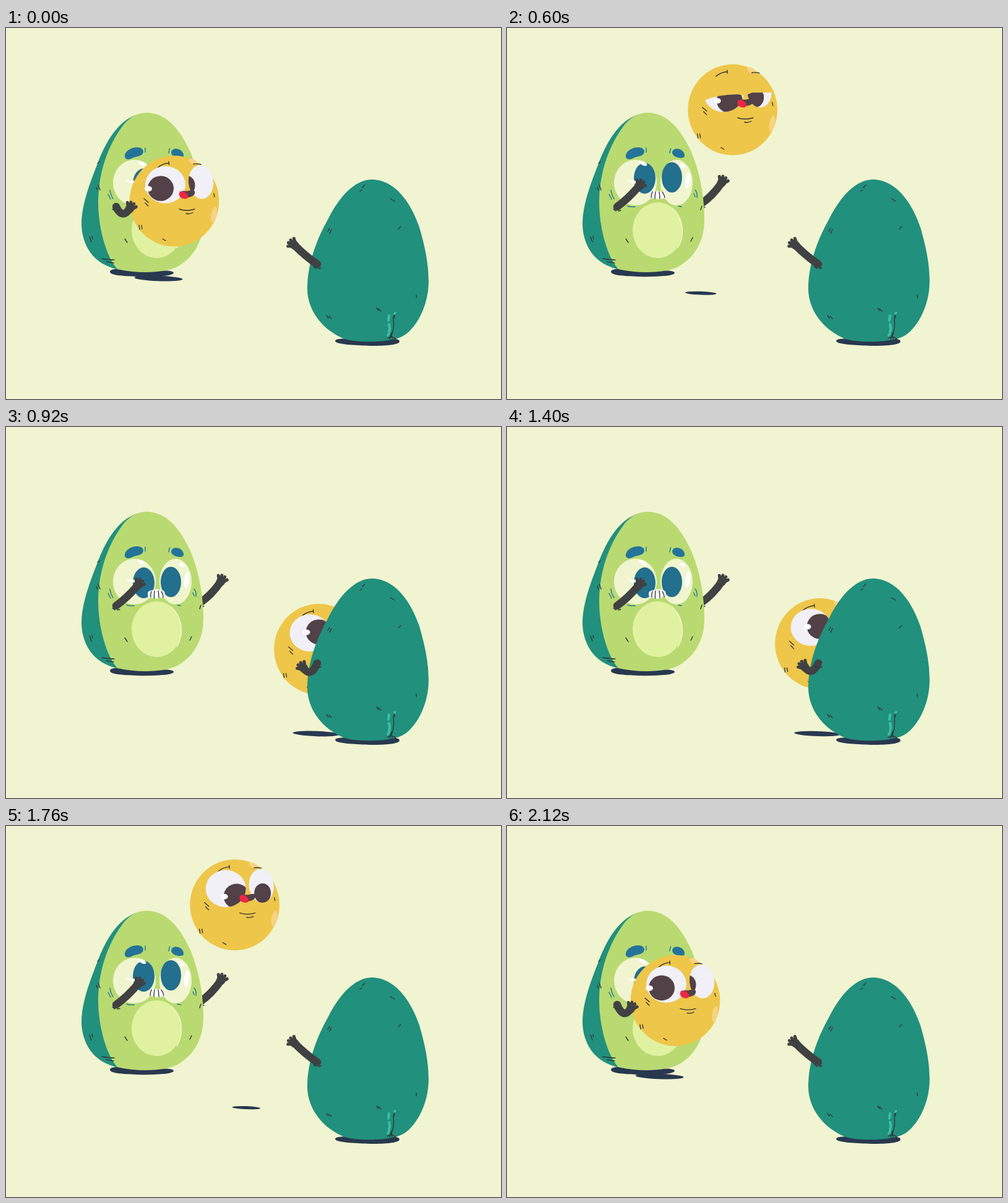
An HTML page that plays this animation: 800x600 px, repeating every 2160 ms.

```html
<!DOCTYPE html>
<html lang="en">
<head>
<meta charset="utf-8">
<title>Avocado catch</title>
<style>
html, body { margin: 0; width: 100%; height: 100%; overflow: hidden; background: #f0f4d0; }
svg { display: block; width: 100vw; height: 100vh; }
.line { fill: none; stroke: #33383a; stroke-width: 1.4; stroke-linecap: round; }
.teal { stroke: #1f7893; }
.arm { fill: none; stroke: #404142; stroke-width: 12.5; stroke-linecap: round; stroke-linejoin: round; }
.shadow { fill: #28384f; }
.skin { fill: #21907d; }
.iris { fill: #236f8e; }
.brow { fill: #24749a; }
.pupil { fill: #524146; }
.white { fill: #fff; }
.cream { fill: #f0f5cf; }
.shine { fill: #f7d384; }
</style>
</head>
<body>
<svg viewBox="0 0 800 600">
  <defs>
    <clipPath id="eyeL"><ellipse cx="-14.5" cy="-26.5" rx="32.5" ry="30"/></clipPath>
    <clipPath id="eyeR"><ellipse cx="43" cy="-31" rx="20" ry="27.5" transform="rotate(-6 43 -31)"/></clipPath>
    <clipPath id="lids"><path id="lid" d="M-80 -8L-46 -15Q-24 -25 8 -25L20 -23 32 -28 70 -28V60H-80Z"/></clipPath>
    <g id="hand">
      <ellipse rx="8" ry="7.2" fill="#404142"/>
      <path d="M1 -4L6 -8.5M3 -2L9.5 -4M3 1L10 1.5M2 4L8 7" fill="none" stroke="#404142" stroke-width="5" stroke-linecap="round"/>
    </g>
  </defs>
  <rect width="800" height="600" fill="#f0f4d0"/>

  <path class="shadow" d="M168 394C168 388 190 389 220 391C248 393 270 391 271 396C271 401 240 403 212 402C188 401 168 400 168 394Z"/>
  <ellipse id="ballShadow" class="shadow"/>

  <g id="farArm"></g>
  <g id="leftAvocado">
    <path class="skin" d="M212 140C180 150 160 187 148 219C136 250 122 285 122 318C123 348 138 383 184 391L240 300Z"/>
    <path fill="#b9da71" d="M228 137C263 138 284 170 299 203C314 240 319 280 319 310C319 350 298 375 275 387C255 396 215 398 180 390C163 372 149 325 149 282C149 235 164 190 191 155C203 142 214 137 228 137Z"/>
    <path class="line" d="M149 254l3 8M146 258l2 4M135 338l3 8M139 337l1 4M155 373q12 2 20 2M162 378l12 2M192 341l4 6M297 345l3 -6M313 294l2 -6M148 219l3 -3"/>
    <path class="line teal" d="M165 269l4 8M168 262q1 8 5 14M304 262q4 4 3 12M302 268l2 5M195 288q6 2 12 1M277 288l5 1M225 194v7M263 202l1.5 -7"/>
    <ellipse cx="243.500" cy="327" rx="40.500" ry="45" fill="#e0f2a0"/>
    <path d="M267 291Q286 310 283 336Q281 348 276 356" fill="none" stroke="#f0f5cf" stroke-width="1.5"/>
    <g id="eyes">
      <ellipse class="cream" cx="207.500" cy="250" rx="34.500" ry="37"/>
      <ellipse class="cream" cx="274" cy="250" rx="26" ry="37"/>
      <g id="gaze">
        <ellipse class="iris" cx="222.500" cy="252" rx="17.500" ry="25"/>
        <ellipse class="iris" cx="266.500" cy="250.500" rx="16.500" ry="24.500"/>
      </g>
      <ellipse class="white" cx="220" cy="219" rx="7" ry="3" transform="rotate(25 220 219)"/>
      <path class="white" d="M194 246Q204 248 214 246L212 252Q200 252 194 246Z"/>
      <ellipse class="white" cx="292" cy="247" rx="4" ry="13" transform="rotate(8 292 247)"/>
      <ellipse class="white" cx="284" cy="223" rx="5" ry="3" transform="rotate(35 284 223)"/>
    </g>
    <path class="brow" d="M192 206C193 199 202 193 212 193C220 193 224 198 221 203C217 209 209 207 203 211C197 214 191 212 192 206Z"/>
    <path class="brow" d="M267 202C267 196 273 194 279 196C285 198 289 205 286 209C281 212 268 209 267 202Z"/>
    <g id="mouthLow">
      <path class="white" d="M229 270C229 263 236 265 239 263C245 261 250 264 255 265C259 270 255 276 249 276C244 279 238 277 235 276C231 277 229 274 229 270Z"/>
      <path class="line" d="M235 266q-2 5 -1 9M240 265q-1 6 -.5 12M246 265q1 6 1 11M251 266q3 4 3 9"/>
    </g>
    <g id="mouthUp">
      <path class="white" d="M232 266Q244 261 255 266L258 274Q245 280 232 274Z"/>
      <path class="line" d="M235 265q-2 5 -2 9M240 265q-1 6 -1 11M246 265q1 6 1 11M251 265q3 4 4 9"/>
    </g>
  </g>

  <g id="ball">
    <ellipse rx="72.300" ry="73.500" fill="#eec649"/>
    <ellipse class="shine" cx="30" cy="-64" rx="7.500" ry="4" transform="rotate(25 30 -64)"/>
    <ellipse class="shine" cx="64" cy="22" rx="4.500" ry="13" transform="rotate(10 64 22)"/>
    <path class="line" d="M-27 -54Q-19 -61 -9 -61.500M-9 -64l.5 5M31 -60q6 -1 12 .5M-49 -4l7 6M-47 3l5 5M-57 39l1 7M-53 39l1 6M-19 61l5 3M64 -12l1 5M8 13Q20 17 33 13M19 20Q25 21.500 30 18.500"/>
    <g clip-path="url(#lids)">
      <g clip-path="url(#eyeL)">
        <rect x="-50" y="-60" width="70" height="70" fill="#f0f0f6"/>
        <ellipse id="pupilL" class="pupil" rx="21" ry="20.300"/>
      </g>
      <g clip-path="url(#eyeR)">
        <rect x="20" y="-60" width="50" height="60" fill="#f0f0f6"/>
        <ellipse id="pupilR" class="pupil" rx="13.500" ry="16"/>
      </g>
      <ellipse id="glint" class="white" rx="6" ry="4.500"/>
    </g>
    <path class="pupil" d="M14 -17C21 -15 25 -18 30 -18C35 -17 34 -10 29 -8C25 -6 20 -5 14 -8Z"/>
    <path fill="#ee2744" d="M8 -13C9 -19 18 -16 21 -11C25 -5 20 -3 15 -4C10 -5 7 -8 8 -13Z"/>
  </g>
  <g id="nearArm"></g>

  <path class="shadow" d="M532 506C533 500 560 503 585 503C612 502 636 500 636 507C635 513 610 514 588 514C565 513 532 512 532 506Z"/>
  <path class="skin" d="M592 245C629 246 654 282 668 322C679 360 683 385 683 410C683 450 662 488 640 499C620 509 565 510 545 502C506 485 485 451 487 416C488 383 500 345 520 310C540 270 565 245 592 245Z"/>
  <path class="line" d="M576 258l4 -4M572 264l3 -2M520 329l3 -5M523 332l3 -6M621 276l7 4M634 325l4 -4M599 453l3 4M602 454l4 4M518 465l3 4M522 466l4 4M663 432l.5 4M631 462q-5 2 -5 8Q628 487 622 500M627 461l1 8M616 502q8 -5 14 1M620 503l3 -10M624 503l-1 -8"/>
  <path d="M628 462l1 -1M619 465l-1 8M619 479q2 8 0 12M617 497l2 -3" fill="none" stroke="#35c3a0" stroke-width="4" stroke-linecap="round"/>
  <g id="rightArm"></g>
</svg>
<script>
const LOOP = 2160, STEP = 40, PEAK = 119;
const LEFT = { x: 272, y: 280 }, RIGHT = { x: 505.5, y: 350.5 };
const THERE = { start: 240, apex: 663, land: 917, rest: 1120, from: LEFT.y, to: RIGHT.y };
const BACK = { start: 1400, apex: 1799, land: 2041, rest: 2160, from: RIGHT.y, to: LEFT.y };
const ARMS = {
  nearArm: { shoulder: [178, 289], open: [196, 276, 213, 256], held: [188, 310, 200, 292] },
  farArm: { shoulder: [314, 284], open: [333, 271, 347, 250], held: [318, 295, 325, 290] },
  rightArm: { shoulder: [503, 382], open: [485, 370, 466, 351], held: [493, 404, 481, 388] }
};

const $ = id => document.getElementById(id);
const set = (id, attrs) => {
  for (const k in attrs) $(id).setAttribute(k, attrs[k]);
};
const mix = (a, b, k) => a + (b - a) * k;
const unit = (t, a, b) => Math.min(1, Math.max(0, (t - a) / (b - a)));
const ramp = (t, a, b) => {
  const u = unit(t, a, b);
  return u * u * (3 - 2 * u);
};
const pulse = (t, a, b, c, d) => ramp(t, a, b) - ramp(t, c, d);
const bump = (t, a, b) => Math.sin(Math.PI * unit(t, a, b));

// Dip, lift to the peak, free fall, then settle in the catcher's hands.
function tossHeight(t, { start, apex, land, rest, from, to }) {
  const dip = 5, sink = 9;
  if (t < apex) {
    return from + dip * ramp(t, start, start + 60) + (PEAK - from - dip) * ramp(t, start + 60, apex);
  }
  return mix(PEAK, to + sink, unit(t, apex, land) ** 2) - sink * ramp(t, land, rest);
}

function drawArm(id, grip, dip) {
  const { shoulder: [x, y], open, held } = ARMS[id];
  const [ex, ey, hx, hy] = open.map((v, i) => mix(v, held[i], grip) + (i % 2 ? dip : 0));
  const angle = Math.atan2(hy - ey, hx - ex) * 180 / Math.PI;
  $(id).innerHTML = `<path class="arm" d="M${x} ${y}Q${ex} ${ey} ${hx} ${hy}"/>
    <use href="#hand" transform="translate(${hx} ${hy}) rotate(${angle})"/>
    <path class="line" d="M${x - 6} ${y + 4}l4 3M${x + 2} ${y + 7}l4 -1"/>`;
}

function drawBall(t) {
  const x = mix(LEFT.x, RIGHT.x, pulse(t, 360, 917, 1405, 2045));
  const y = tossHeight(t, t < BACK.start ? THERE : BACK);
  set('ball', { transform: `translate(${x} ${y})` });

  const ground = pulse(t, 466, 866, 1543, 2012);
  const cx = 246.5 + 255 * ground, cy = 405 + 91 * ground;
  const rx = Math.min(39, 39 - (cy - y - 125) * .08);
  set('ballShadow', { cx, cy, rx, ry: rx * .11, transform: `rotate(2 ${cx} ${cy})` });
}

function drawLook(t) {
  const squint = ramp(t, 440, 560), arrive = ramp(t, 720, 880);
  const fall = ramp(t, 1560, 1720), home = ramp(t, 1880, 2040);
  const x = -22 + 17 * squint + 5 * arrive + 3 * fall - 25 * home + 22 * 0;
  const y = -20.5 + 5.5 * squint - 13 * arrive + 14 * fall - 6.5 * home;
  set('pupilL', { cx: x, cy: y });
  set('pupilR', { cx: x + 42, cy: y - 5 });
  set('glint', { cx: x - 20, cy: y + .5 });
  set('lid', { transform: `translate(0 ${-55 * (1 - pulse(t, 440, 560, 720, 840))})` });
}

function drawWatcher(t) {
  const up = pulse(t, 440, 520, 760, 880) + pulse(t, 1520, 1640, 1960, 2080);
  const blink = pulse(t, 320, 390, 410, 480);
  set('gaze', { transform: `translate(0 ${-9 * up})` });
  set('eyes', { transform: `translate(0 ${287 * blink}) scale(1 ${1 - blink})` });
  set('mouthLow', { opacity: up < .5 ? 1 : 0 });
  set('mouthUp', { opacity: up < .5 ? 0 : 1 });
}

function draw(t) {
  drawBall(t);
  drawLook(t);
  drawWatcher(t);
  const leftGrip = 1 - pulse(t, 320, 440, 1940, 2050);
  const rightGrip = pulse(t, 800, 910, 1480, 1600);
  drawArm('nearArm', leftGrip, 5 * (bump(t, 240, 400) + bump(t, 1980, LOOP)));
  drawArm('farArm', leftGrip, 0);
  drawArm('rightArm', rightGrip, 4 * (bump(t, 880, 1120) + bump(t, 1400, 1560)));
}

const start = performance.now();
function tick() {
  const t = (performance.now() - start) % LOOP;
  draw(Math.floor(t / STEP) * STEP);
  requestAnimationFrame(tick);
}
tick();
</script>
</body>
</html>
```
